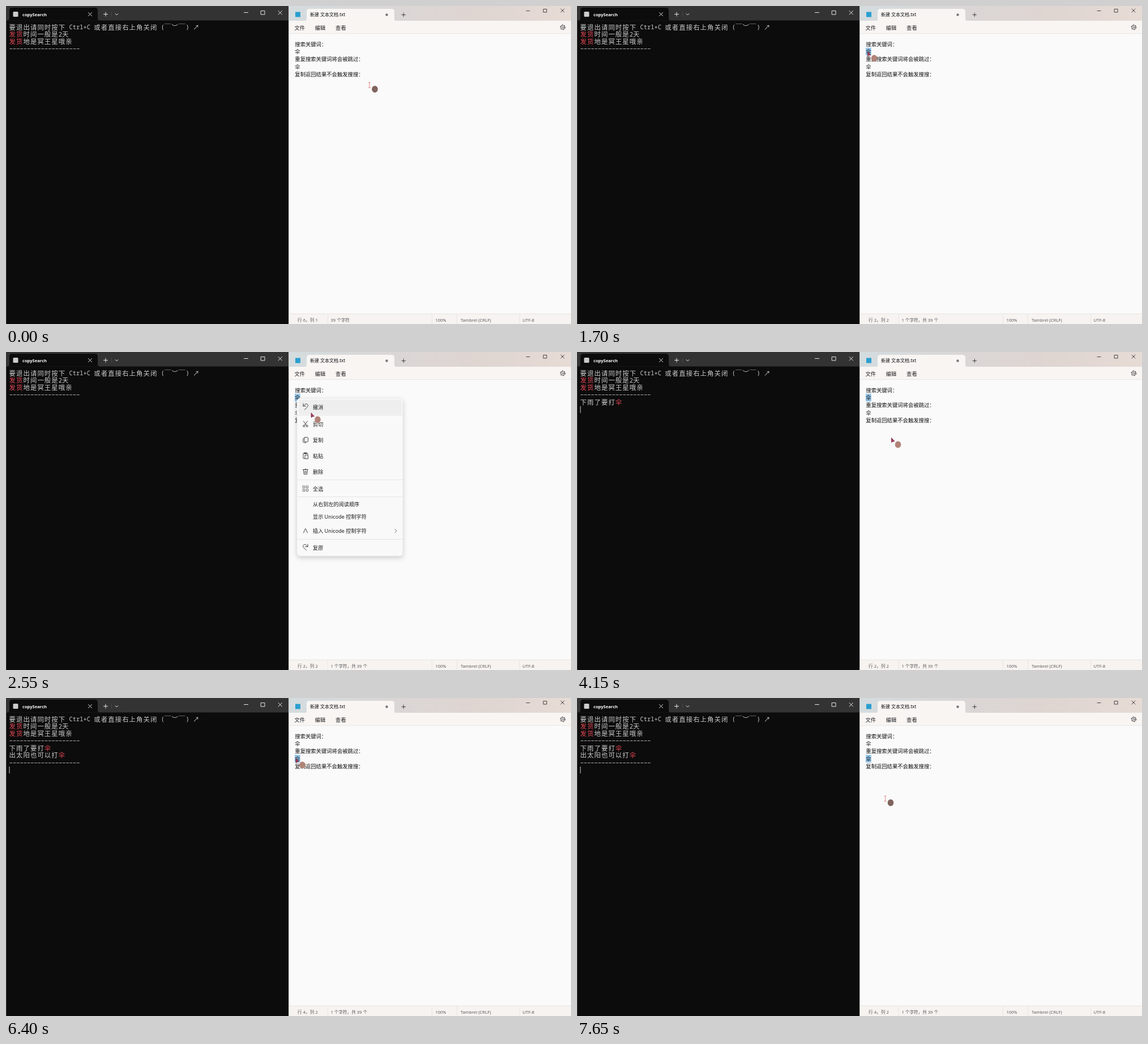
Recreate the animation shown at these times as an HTML page. Size 998 px wide and 561 px high, loop 8 s.

```html
<!DOCTYPE html>
<html lang="zh-CN">
<head>
<meta charset="utf-8">
<title>copySearch</title>
<style>
html, body { margin: 0; width: 100%; height: 100%; overflow: hidden; background: #fafafa; }
svg { display: block; width: 100%; height: 100%; }
text { font-family: "Noto Sans", "Noto Sans CJK SC", sans-serif; white-space: pre; }
.wide { font: 11.4px "Noto Sans CJK SC", sans-serif; letter-spacing: 1.08px; }
.mono { font: 10.4px "Noto Sans Mono", "DejaVu Sans Mono", monospace; }
.line { fill: none; stroke-linecap: round; stroke-linejoin: round; }
#panel { filter: drop-shadow(0 3px 4px rgba(0,0,0,.18)); }
</style>
</head>
<body>
<svg id="stage" viewBox="0 0 998 561" xmlns="http://www.w3.org/2000/svg">
  <defs>
    <linearGradient id="bar">
      <stop offset="0" stop-color="#d4dcdf"/>
      <stop offset=".4" stop-color="#dbd6d5"/>
      <stop offset=".7" stop-color="#dfd5d1"/>
      <stop offset="1" stop-color="#e7dbd5"/>
    </linearGradient>
    <clipPath id="reveal"><rect id="revealBox" x="-20" y="-10" width="230" height="0"/></clipPath>
  </defs>

  <g id="terminal">
    <rect width="499" height="561" fill="#0c0c0c"/>
    <rect width="499" height="25.5" fill="#333"/>
    <rect width="1" height="561" fill="#3a3a3a"/>
    <path d="M2 25.5q4 0 4-4V8q0-5 5-5h146q5 0 5 5v13.5q0 4 4 4z" fill="#0c0c0c"/>
    <rect x="12.5" y="10" width="9" height="9" rx="1.5" fill="#ccc"/>
    <text x="29" y="17.7" font-size="7.6" font-weight="600" fill="#fff">copySearch</text>
    <path class="line" stroke="#e6e6e6" d="M145.5 11.5l6 6m0-6l-6 6M172.5 14.5h7m-3.5-3.5v7M193 13.5l2.5 2.5 2.5-2.5M420.5 11.5h7M450.5 8.5h6.5v6.5h-6.5zM481 8.5l6.5 6.5m0-6.5l-6.5 6.5"/>
    <path stroke="#484848" d="M186.5 10v9"/>
    <g id="output"></g>
    <rect id="prompt" x="5.5" width="1" height="12" fill="#ccc"/>
  </g>

  <g id="editor">
    <rect x="499" width="499" height="561" fill="#fafafa"/>
    <rect x="499" width="499" height="27" fill="url(#bar)"/>
    <rect x="499" y="26" width="499" height="22.5" fill="#f8f5f3"/>
    <path d="M527 26.5q4 0 4-4V10q0-5 5-5h145q5 0 5 5v12.5q0 4 4 4z" fill="#f8f5f3"/>
    <path stroke="#e9e6e4" d="M500 48.5h498"/>
    <rect x="511" y="10.5" width="9" height="9" fill="#2a9fd0"/>
    <circle cx="672.5" cy="15.5" r="2.2" fill="#777"/>
    <path class="line" stroke="#333" stroke-width=".9" d="M699 15.5h6.5m-3.25-3.25v6.5M919 8.5h6M949.5 5.5h5.5v5.5h-5.5zM980 5l6 6m0-6l-6 6"/>
    <g class="line" stroke="#444">
      <circle cx="983.5" cy="37.5" r="3.6" stroke-width=".9"/>
      <circle cx="983.5" cy="37.5" r="4.5" stroke-dasharray="2 2.7" stroke-linecap="butt"/>
      <circle cx="983.5" cy="37.5" r="1.4" stroke-width=".8"/>
    </g>
    <rect x="499" y="543" width="499" height="18" fill="#f6f3f0"/>
    <path stroke="#e8e5e2" d="M500 543h498M568.5 544v17M752.5 544v17M796.5 544v17M907.5 544v17"/>
    <path stroke="#c8c8c8" d="M499.5 0v561"/>
    <rect id="selection" height="13.5" fill="#93c4e8"/>
    <rect id="caret" x="519.5" width="1" height="13.5" fill="#111"/>
    <g id="labels"></g>
  </g>

  <g id="menu"><g clip-path="url(#reveal)">
    <rect id="panel" width="187" height="278" rx="5" fill="#f9f9f9" stroke="#e6e6e6" stroke-width=".6"/>
    <rect id="hover" x="3" width="182" height="26" rx="3" fill="#eee"/>
    <path stroke="#e5e5e5" d="M0 29.5h187M0 143.5h187M0 173.5h187M0 248.5h187"/>
    <path class="line" stroke="#555" stroke-width=".9" d="M173 230.5l3 3-3 3"/>
    <g id="items"></g>
  </g></g>

  <g id="cursor">
    <path id="beam" class="line" stroke="#e58a8a" d="M-1.7-4.5h3.4M0-4.5v9M-1.7 4.5h3.4"/>
    <path id="arrow" d="M-2-4.5v8l2-1.5 3.5-.5z" fill="#b23a5a" stroke="#5d2238" stroke-width=".7"/>
    <ellipse id="charm" cx="9.5" cy="7.2" rx="5.3" ry="6"/>
  </g>
</svg>
<script>
const LOOP = 8000, STEP = 50;
const NS = 'http://www.w3.org/2000/svg';
const $ = id => document.getElementById(id);

function add(parent, tag, attrs, content) {
  const el = document.createElementNS(NS, tag);
  set(el, attrs);
  if (content) el.textContent = content;
  parent.appendChild(el);
  return el;
}
function set(el, attrs) {
  for (const k in attrs) el.setAttribute(k, attrs[k]);
}
function show(el, on) {
  el.style.display = on ? '' : 'none';
}

// Terminal rows: half-width cells, "*" toggles red.
const CELL = 6.24, ROW = 12.75;
function terminalRow(row, source) {
  const g = add($('output'), 'g', {});
  let cell = 0;
  source.split('*').forEach((part, i) => {
    const fill = i % 2 ? '#e74856' : '#ccc';
    for (const run of part.match(/[\x20-\x7e−]+|[^\x20-\x7e−]+/g) || []) {
      const narrow = /[\x20-\x7e−]/.test(run);
      add(g, 'text', {
        x: 5.5 + cell * CELL, y: (narrow ? 41.1 : 41.5) + row * ROW,
        fill, class: narrow ? 'mono' : 'wide'
      }, run);
      cell += run.length * (narrow ? 1 : 2);
    }
  });
  return g;
}
const RULE = '−'.repeat(20);
const rows = [
  '要退出请同时按下 Ctrl+C 或者直接右上角关闭 (￣︶￣) ↗',
  '*发货*时间一般是2天',
  '*发货*地是冥王星哦亲',
  RULE,
  '下雨了要打*伞*',
  '出太阳也可以打*伞*',
  RULE
].map((s, i) => terminalRow(i, s));

// Editor text
function label(x, y, size, fill, content) {
  return add($('labels'), 'text', { x, y, 'font-size': size, fill }, content);
}
label(537, 18.4, 8, '#111', '新建 文本文档.txt');
['文件', '编辑', '查看'].forEach((s, i) => label(509.5 + i * 36.3, 41.6, 9.3, '#222', s));
['搜索关键词：', '伞', '重复搜索关键词将会被跳过：', '伞', '复制返回结果不会触发搜搜：']
  .forEach((s, i) => label(510.3, 71 + i * 13.2, 9.33, '#111', s));
const place = label(515, 557, 7.7, '#5c5c5c', ' ');
const count = label(573.5, 557, 7.6, '#5c5c5c', ' ');
label(758.5, 557, 7.5, '#5c5c5c', '100%');
label(803, 557, 7.7, '#5c5c5c', 'Tambrel (CRLF)');
label(912.5, 557, 7.7, '#5c5c5c', 'UTF-8');

// Context menu
const UNDO = 'M-4-6v4.5h4.5M-4-1.5l3-3a3 3 0 0 1 4.5 4.3l-5 5';
const box = (x, y) => `M${x} ${y}h3.5v3.5h-3.5z`;
const ring = x => `M${x} 3.6a1.6 1.6 0 1 0 3.2 0a1.6 1.6 0 1 0-3.2 0`;
const ITEMS = [
  [15, '撤消', UNDO],
  [45, '剪切', 'M-3.5-5L1.8 2.3M3.5-5L-1.8 2.3' + ring(-4.3) + ring(1.1)],
  [73, '复制', 'M-1-4.5h4.5q1 0 1 1v6q0 1-1 1h-4.5q-1 0-1-1v-6q0-1 1-1zM-2.2-3q-2.1 0-2.1 1.8v4q0 2.2 2 2.2h3.2'],
  [101, '粘贴', 'M-1.5 5h-1.5q-1 0-1-1v-7.5q0-1 1-1h6q1 0 1 1v1M-2-5.2h4v1.6h-4zM-.5-1.2h5v6.5h-5z'],
  [129, '删除', 'M-4.5-3.5h9M-1.3-3.5a1.3 1.3 0 0 1 2.6 0M-3.5-3.5l.7 8h5.6l.7-8M-1-1v3.5M1-1v3.5'],
  [159, '全选', box(-4.7, -4.7) + box(1.2, -4.7) + box(-4.7, 1.2) + box(1.2, 1.2)],
  [186, '从右到左的阅读顺序'],
  [208.5, '显示 Unicode 控制字符'],
  [233.5, '插入 Unicode 控制字符', 'M-3.5 3.5L-.5-3.5q.5-1 1 0L3.5 3.5'],
  [263, '复原', UNDO]
];
ITEMS.forEach(([y, name, icon]) => {
  add($('items'), 'text', { x: 28, y: y + 3.6, 'font-size': 9.15, fill: '#1c1c1c' }, name);
  if (!icon) return;
  const flip = name === '复原' ? ' scale(-1 1)' : '';
  const path = add($('items'), 'path', {
    class: 'line', d: icon, stroke: '#333', 'stroke-width': 0.9,
    transform: `translate(15 ${y})${flip}`
  });
  if (name === '全选') path.setAttribute('stroke-dasharray', '1.2 1.4');
});

// Pointer stops: time, x, y
const PATH = [
  [0, 642, 139.5], [600, 513, 82], [850, 519, 82], [1050, 522, 83],
  [1450, 522, 83], [1700, 515.5, 85], [2350, 515.5, 85], [2550, 541, 112],
  [2950, 557.5, 156], [4850, 557.5, 156], [5050, 616, 128], [5250, 566, 107],
  [5350, 561, 99.5], [5450, 561, 99.5], [6000, 513, 110], [6200, 521, 107],
  [6300, 520, 108], [6400, 514, 111], [6950, 514, 111], [7450, 544.5, 177.5],
  [LOOP, 544.5, 177.5]
];
function pointer(t) {
  const i = PATH.findIndex(p => p[0] > t);
  const [t0, x0, y0] = PATH[i - 1], [t1, x1, y1] = PATH[i];
  const k = (t - t0) / (t1 - t0);
  return [x0 + (x1 - x0) * k, y0 + (y1 - y0) * k];
}

// Open time, close time, fade length, top edge
const MENUS = [[2150, 3000, 150, 82], [6750, 7550, 100, 109]];
function drawMenu(t, tipY) {
  const m = MENUS.find(([open, close, fade]) => t > open && t < close + fade);
  show($('menu'), m);
  if (!m) return;
  const [open, close, fade, top] = m;
  const k = Math.min(1, (t - open) / 200);
  const height = 278 * (1 - (1 - k) ** 3);
  set($('menu'), { transform: `translate(514 ${top})`, opacity: Math.min(1, 1 - (t - close) / fade) });
  set($('panel'), { height });
  set($('revealBox'), { height: height + (k < 1 ? 10 : 30) });
  const item = ITEMS.find(([y]) => Math.abs(tipY - top - y) <= 14);
  show($('hover'), item);
  if (item) set($('hover'), { y: item[0] - 13 });
}

function drawEditor(t) {
  const within = (a, b) => t >= a && t < b;
  const second = t >= 6300;
  const lineBreak = within(950, 1500);
  const selected = lineBreak || within(1650, 6300) || t >= 6350;
  const y = second ? 100.3 : 73.7;
  show($('selection'), selected);
  set($('selection'), { x: lineBreak ? 519.5 : 510, y, width: lineBreak ? 3.5 : 9.7 });
  show($('caret'), t >= 900 && !selected);
  set($('caret'), { y });
  place.textContent = t < 900 ? '行 6，列 1' : second ? '行 4，列 2' : '行 2，列 2';
  count.textContent = selected ? '1 个字符，共 39 个' : '39 个字符';
}

function drawTerminal(t) {
  rows.forEach((row, i) => show(row, i < 4 || t >= (i === 4 ? 4150 : 4200)));
  show($('prompt'), t >= 4150);
  set($('prompt'), { y: t < 4200 ? 95.5 : 121 });
}

function draw(t) {
  const [x, y] = pointer(t);
  const isArrow = (t >= 1650 && t < 4950) || (t >= 6350 && t < 7650);
  set($('cursor'), { transform: `translate(${x} ${y})` });
  show($('arrow'), isArrow);
  show($('beam'), !isArrow);
  set($('charm'), { fill: isArrow ? '#b08478' : '#80635d' });
  drawTerminal(t);
  drawEditor(t);
  drawMenu(t, y - 4.5);
}

const start = performance.now();
function tick() {
  const t = (performance.now() - start) % LOOP;
  draw(Math.floor(t / STEP) * STEP);
  requestAnimationFrame(tick);
}
tick();
</script>
</body>
</html>
```
